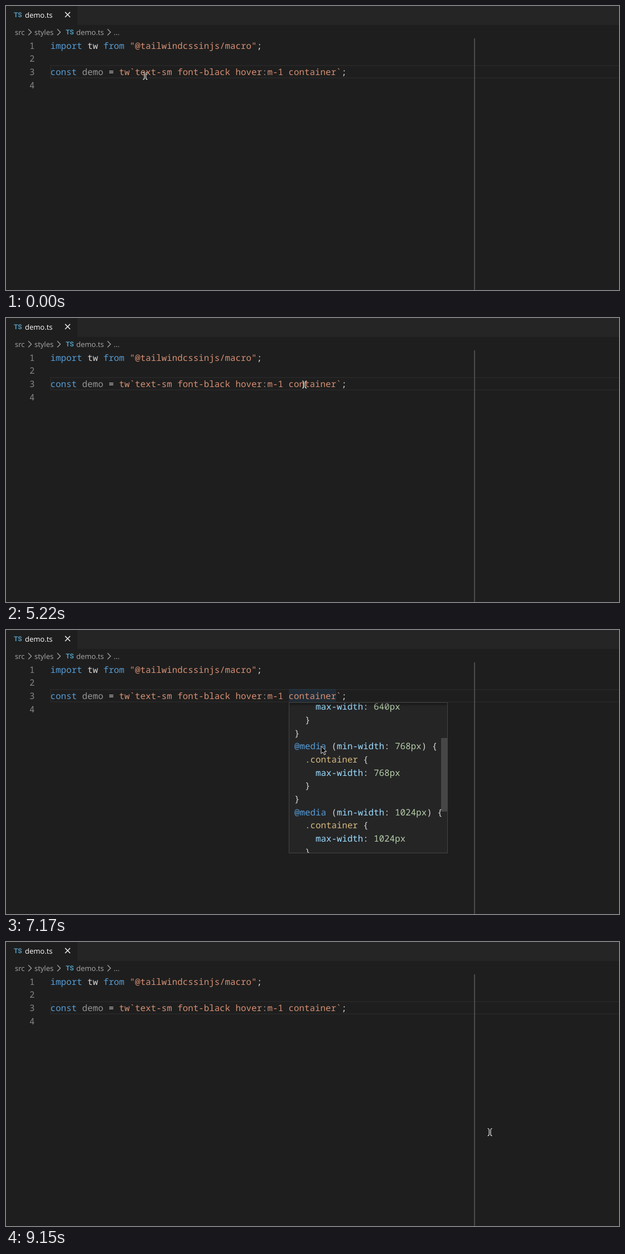
These frames come from a looping animation (1099 px wide and 510 px high, 9240 ms). An HTML page:

```html
<!DOCTYPE html>
<html lang="en">
<head>
<meta charset="utf-8">
<title>Editor hover preview</title>
<style>
  html, body { margin: 0; width: 100%; height: 100%; overflow: hidden; background: #1e1e1e; }
  #stage { position: relative; width: 1099px; height: 510px; overflow: hidden; color: #d4d4d4;
    text-rendering: geometricPrecision; }
  #stage div, #stage pre, #stage svg { position: absolute; margin: 0; }
  pre { font: 15.82px/23.67px "Noto Sans Mono", monospace; font-variant-ligatures: none; }
  i { font-style: normal; }
  .kw { color: #569cd6; }
  .str { color: #d68f72; }
  .sel { color: #d7ba7d; }
  .prop { color: #9cdcfe; }
  .num { color: #b5cea8; }
  .dim { color: #949494; }

  #tabs { left: 128px; top: 0; right: 0; height: 34px; background: #252526; }
  .ui { font: 13px/20px "Open Sans", sans-serif; color: #a9a9a9; white-space: pre; }
  .ts { font: bold 12px/20px Roboto, sans-serif; color: #519aba; }
  #gutter { left: 42px; top: 59.5px; color: #858585; }
  #code { left: 79.5px; top: 59.5px; }
  #line { left: 79px; top: 106px; right: 0; height: 20px; border: 2px solid #262626; border-right: 0; }
  #ruler { left: 839px; top: 58px; width: 2px; height: 452px; background: #4c4c4c; }
  #mark { top: 106px; height: 23px; background: rgba(38, 79, 120, .25); }

  .pop { box-sizing: border-box; background: #252526; border: 1px solid #454545; overflow: hidden; }
  .pop pre { left: 9px; top: 5px; }
  #shade { inset: 0; box-shadow: #000 0 6px 6px -6px inset; }
  #thumb { right: 0; top: 0; width: 11px; height: 132px; background: rgba(121, 121, 121, .4); }
</style>
</head>
<body>
<div id="stage">
  <div id="tabs"></div>
  <div class="ts" style="left:14px;top:6px">TS</div>
  <div class="ui" style="left:34px;top:6px;color:#fff">demo.ts</div>
  <div class="ui" style="left:16px;top:37px">src</div>
  <div class="ui" style="left:51px;top:37px">styles</div>
  <div class="ts" style="left:107px;top:37px">TS</div>
  <div class="ui" style="left:126px;top:37px">demo.ts</div>
  <div class="ui" style="left:193px;top:37px">...</div>
  <svg width="220" height="60" fill="none" stroke-width="1.2">
    <path d="M106 11l9 9m0-9l-9 9" stroke="#fff" stroke-width="1.4"/>
    <g stroke="#a9a9a9">
      <path id="chevron" d="M40 41.5l5.5 5.5-5.5 5.5"/>
      <use href="#chevron" x="52"/>
      <use href="#chevron" x="142"/>
    </g>
  </svg>
  <div id="line"></div>
  <div id="mark"></div>
  <pre id="gutter">1
2
3
4</pre>
  <pre id="code"><i class="kw">import</i> tw <i class="kw">from</i> <i class="str">"@tailwindcssinjs/macro"</i>;

<i class="kw">const</i> <i class="dim">demo</i> = <i class="str">tw`text-sm font-black hover<i class="dim">:</i>m-1 container`</i>;
</pre>
  <div id="ruler"></div>
  <svg id="cursor" width="24" height="32" viewBox="-8 -10 24 32" fill="none">
    <g id="beam">
      <path d="M0-6V6" stroke="#111" stroke-width="2"/>
      <path id="half" d="M-4-6.5q2.7 0 2.7 3v7q0 3-2.7 3" stroke="#fff" stroke-width="1.1"/>
      <use href="#half" transform="scale(-1 1)"/>
    </g>
    <path id="arrow" d="M.5.8v13.7l3.2-2.9 2.3 5 2.2-1-2.2-4.800h4z" fill="#000" stroke="#fff" stroke-width=".9"/>
  </svg>
</div>
<script>
const LOOP = 9240, TICK = 78;
const CHAR = 9.49, ROW = 23.67, LEFT = 79.6;
const VIEW = 271, CONTENT = 552;

const $ = id => document.getElementById(id);
const clamp = v => Math.min(1, Math.max(0, v));
const ease = (t, from, to) => {
  const p = clamp((t - from) / (to - from));
  return p * p * (3 - 2 * p);
};

const codeLine = $('code').textContent.split('\n')[2];

const tag = css => css.replace(
  /(@media)|(\.[\w\\:-]+)|([\w-]+)(?=:)|(\b\d[\w.%]*)/g,
  (m, kw, sel, prop) => `<i class="${kw ? 'kw' : sel ? 'sel' : prop ? 'prop' : 'num'}">${m}</i>`);

const rule = (sel, body, pad = '') => `${pad}${sel} {\n${pad}  ${body}\n${pad}}`;
const media = w => `@media (min-width: ${w}px) {\n${rule('.container', `max-width: ${w}px`, '  ')}\n}`;

// A popup is sized by its text and sits above its word, or below if it is too tall.
function makePop(word, css, from, to) {
  const lines = css.split('\n');
  const x = Math.round(LEFT + codeLine.indexOf(word) * CHAR);
  const w = Math.ceil(Math.max(...lines.map(l => l.length)) * CHAR + 19);
  const h = Math.min(VIEW, Math.round(lines.length * ROW + 10));
  const y = h < 107 ? 107 - h : 130;
  const el = document.createElement('div');
  el.className = 'pop';
  el.style.cssText = `left:${x}px;top:${y}px;width:${w}px;height:${h}px`;
  el.innerHTML = `<pre>${tag(css)}</pre>`;
  $('stage').insertBefore(el, $('cursor'));
  return { el, x, from, to, markWidth: word.length * CHAR };
}

const sheet = [rule('.container', 'width: 100%'), ...[640, 768, 1024, 1280].map(media)].join('\n');
const pops = [
  makePop('text-sm', rule('.text-sm', 'font-size: 0.875rem'), 390, 1230),
  makePop('font-black', rule('.font-black', 'font-weight: 900'), 1870, 2720),
  makePop('hover:m-1', rule('.hover\\:m-1:hover', 'margin: 0.25rem'), 3430, 4830),
  makePop('container', sheet, 5530, 9120)
];
const box = pops[3];
const list = box.el.firstChild;
box.el.insertAdjacentHTML('beforeend', '<div id="shade"></div><div id="thumb"></div>');

const start = { x: 249.5, y: 125.5 };
const moves = [
  { from: 0, to: 78, x: 249.5, y: 122 },
  { from: 1080, to: 1470, x: 327.5, y: 119.5, dip: 4 },
  { from: 2570, to: 3430, x: 450, y: 122, dip: 10 },
  { from: 4670, to: 4900, x: 517.5, y: 124 },
  { from: 4990, to: 5220, x: 535, y: 119.5 },
  { from: 5930, to: 6150, x: 564.5, y: 207.5 },
  { from: 9000, to: 9120, x: 867.5, y: 341.5 }
];
const flicks = [
  { from: 6400, to: 6940, by: 110 },
  { from: 7090, to: 7410, by: 102.5 },
  { from: 7580, to: 7720, by: 6 },
  { from: 8080, to: 8500, by: 63.5 }
];

function pointerAt(t) {
  let { x, y } = start;
  for (const m of moves) {
    const p = ease(t, m.from, m.to);
    x += (m.x - x) * p;
    y += (m.y - y) * p + (m.dip || 0) * Math.sin(Math.PI * p);
  }
  return { x, y };
}

function draw(t) {
  const open = pops.find(p => t >= p.from && t < p.to);
  for (const p of pops) p.el.style.opacity = p === open ? clamp((t - p.from + TICK) / (2 * TICK)) : 0;
  const mark = $('mark').style;
  mark.display = open ? '' : 'none';
  if (open) {
    mark.left = open.x + 'px';
    mark.width = open.markWidth + 'px';
  }

  const { x, y } = pointerAt(t);
  const arrow = open === box && y > 130;
  $('cursor').style.transform = `translate(${x - 8}px, ${y - 10}px)`;
  $('beam').style.display = arrow ? 'none' : '';
  $('arrow').style.display = arrow ? '' : 'none';

  const top = flicks.reduce((sum, f) => sum + f.by * ease(t, f.from, f.to), 0);
  list.style.transform = `translateY(${-top}px)`;
  $('thumb').style.transform = `translateY(${top * VIEW / CONTENT}px)`;
  $('shade').style.display = top ? '' : 'none';
}

// The picture advances in even ticks, like a screen recording.
function tick() {
  const t = performance.now() % LOOP;
  draw(Math.floor((t + 20) / TICK) * TICK);
  requestAnimationFrame(tick);
}
tick();
</script>
</body>
</html>
```
